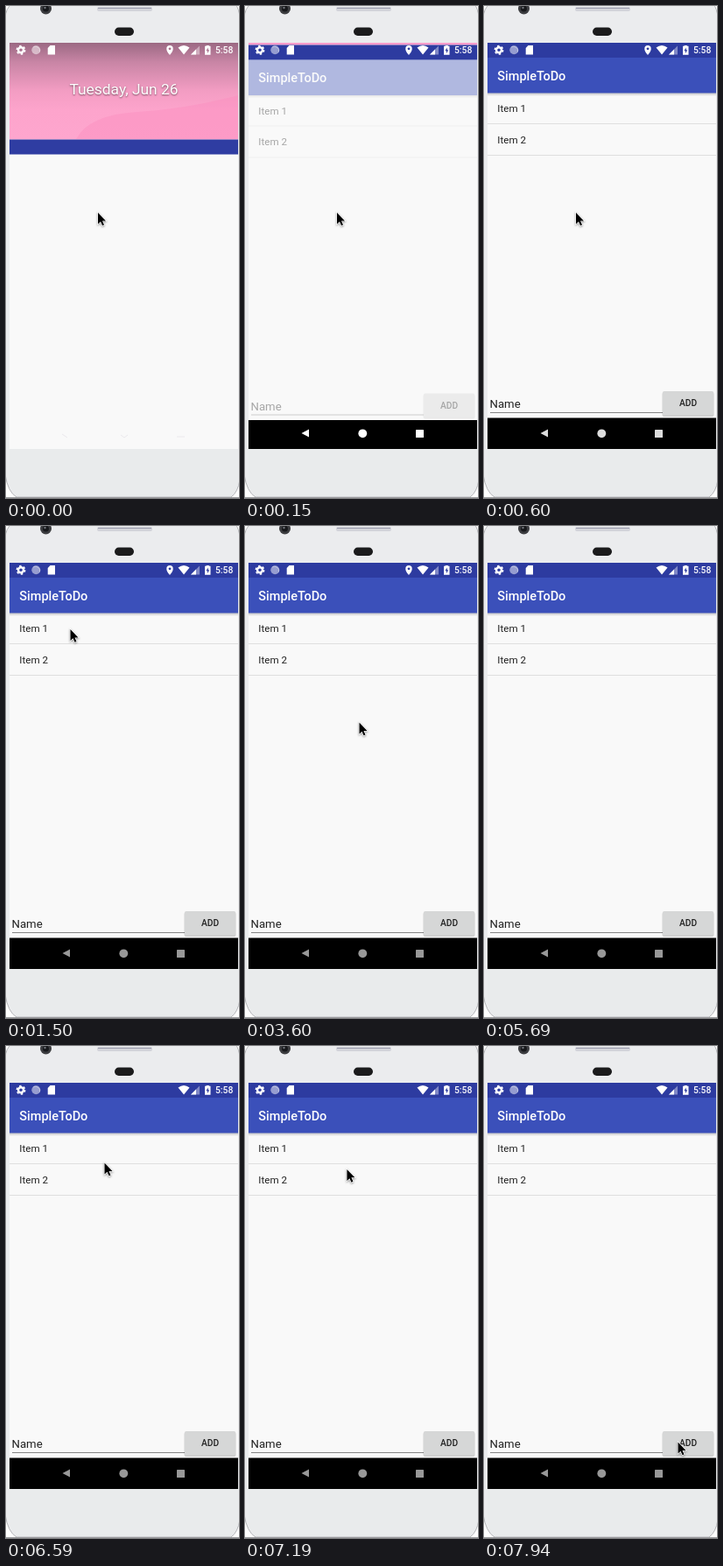
Recreate the animation shown at these times as an HTML page. Size 266 by 562 pixels, loop 8000 ms.

```html
<!DOCTYPE html>
<html lang="en">
<head>
<meta charset="utf-8">
<title>To-do app on a phone</title>
<style>
  html, body { margin: 0; width: 100%; height: 100%; overflow: hidden; background: #fff; }
  svg { display: block; width: 266px; height: 562px; }
  text { font-family: Roboto, sans-serif; fill: #222; }
  .medium { font-weight: 500; }
  .light { fill: #fff; }
</style>
</head>
<body>
<svg viewBox="0 0 266 562">
  <defs>
    <linearGradient id="wallpaper" x2="0" y2="1">
      <stop offset="0" stop-color="#9b6983"/>
      <stop offset=".2" stop-color="#c885a5"/>
      <stop offset=".5" stop-color="#f39dc3"/>
      <stop offset=".7" stop-color="#fda4cc"/>
      <stop offset="1" stop-color="#fea6ce"/>
    </linearGradient>
    <linearGradient id="shade" x2="0" y2="1">
      <stop offset="0" stop-opacity=".2"/>
      <stop offset="1" stop-opacity="0"/>
    </linearGradient>
    <clipPath id="screen"><path d="M4 42H265V506H4Z"/></clipPath>
  </defs>

  <!-- phone body -->
  <path d="M-1 13Q0 3 6 -2H262Q266 3 267 13V541Q265 555 257 561H12Q2 555 -1 535Z" fill="#ebecee" stroke="#b4b5b8"/>
  <path d="M4 506H265V545Q263 555 256 560H13Q5 555 4 540Z" fill="#e9ebec"/>
  <path d="M0 561.5H266" stroke="#9a9b9d"/>
  <circle cx="45.5" cy="3" r="6.5" fill="#3c3d40"/>
  <circle cx="45.5" cy="3" r="3.5" fill="#17181b"/>
  <circle cx="44.5" cy="2" r="1.2" fill="#72757c"/>
  <rect x="104" y="1" width="63" height="5" rx="2" fill="#d3d4da"/>
  <path d="M105 2.500H166" stroke="#9a9bad"/>
  <rect x="124" y="24.500" width="22" height="9.500" rx="4.700" fill="#1b1b1c"/>

  <g clip-path="url(#screen)">
    <rect x="4" y="42" width="261" height="464" fill="#f9f9f9"/>

    <g id="home">
      <rect x="4" y="42" width="261" height="110.500" fill="url(#wallpaper)"/>
      <path d="M80 152Q95 124 150 121T265 102V152Z" fill="#fa8abc" opacity=".4"/>
      <path d="M4 152.500H265V169.500H4Z" fill="#2f3da2"/>
      <path d="M64 489l6 4M131 490l4 3 4-3M195 492h9" fill="none" stroke="#ebe9ed"/>
      <text class="light" x="134.500" y="101" font-size="17.400" text-anchor="middle"
            style="text-shadow:0 1px 2px #0008">Tuesday, Jun 26</text>
    </g>

    <g id="app">
      <path d="M4 39H265V42H4Z" fill="#ff9ccb"/>
      <path d="M4 42H265V59H4Z" fill="#2d3ba0"/>
      <g id="content">
        <path d="M4 59H265V99.500H4Z" fill="#3b50ba"/>
        <path d="M4 99.500H265V103H4Z" fill="url(#shade)"/>
        <text class="medium light" x="15.300" y="84.700" font-size="14.500">SimpleToDo</text>
        <text x="15.300" y="121" font-size="11.600">Item 1</text>
        <text x="15.300" y="156.500" font-size="11.600">Item 2</text>
        <path d="M4 134.500H265M4 170.500H265" stroke="#dfdfdf"/>
        <text x="6.500" y="459" font-size="13.200">Name</text>
        <path d="M7 464.500H204" stroke="#858585"/>
        <rect x="203.500" y="441" width="59" height="28" rx="2" opacity=".17"/>
        <rect x="204" y="440" width="58" height="27.300" rx="1.500" fill="#d6d7d7"/>
        <text class="medium" x="233" y="457.300" font-size="10.200" text-anchor="middle">ADD</text>
      </g>
      <path d="M4 470.500H265V510H4Z"/>
    </g>

    <g id="nav">
      <path d="M64.500 488L73 483.500V492.500Z"/>
      <circle cx="134.300" cy="488.300" r="4.900"/>
      <rect x="195" y="484" width="9" height="9" rx=".6"/>
    </g>

    <!-- status bar -->
    <g class="light" fill="#fff">
      <circle cx="17" cy="50.300" r="3" fill="none" stroke="#fff" stroke-width="2.400"/>
      <circle cx="17" cy="50.300" r="4.700" fill="none" stroke="#fff" stroke-width="1.500" stroke-dasharray="2.460"/>
      <circle cx="34.300" cy="50.300" r="5" opacity=".5"/>
      <path d="M31 47a5 5 0 0 1 7.500 5.500" fill="none" stroke="#fff" opacity=".4"/>
      <path d="M50.500 45H56V55.500H47.700V48Z"/>
      <path id="pin" d="M187 56C184 52.500 183.300 51 183.300 48.800a3.700 3.700 0 0 1 7.400 0C190.700 51 190 52.500 187 56ZM187 47.400a1.400 1.400 0 1 0 .01 0Z" fill-rule="evenodd"/>
      <path d="M196.500 47.500Q203 42.500 209.500 47.500L203 55.500Z"/>
      <path d="M211 55.500L221 45.500V55.500Z" opacity=".4"/>
      <path d="M211 55.500L217 49.500V55.500Z"/>
      <path d="M228.700 45.800V45H231.800V45.800H233.500V55.700H227V45.800ZM230.800 47.500L228.400 51.200H229.900V54.200L232.200 50.300H230.800Z" fill-rule="evenodd"/>
      <text class="medium light" x="239" y="54" font-size="10.300">5:58</text>
    </g>
  </g>

  <path id="cursor" d="M0 0V13L3 10.300L5 14.800L7 13.900L5 9.400H9Z" stroke="#fff"
        stroke-width="1.400" paint-order="stroke" style="filter:drop-shadow(0 1px 1px #0006)"/>
</svg>

<script>
const LOOP = 8000;
const STEP = 150;

const el = id => document.getElementById(id);
const show = (id, on) => el(id).setAttribute("visibility", on ? "visible" : "hidden");
const smooth = p => p * p * (3 - 2 * p);

// Progress from 0 to 1, advancing once per refresh
function progress(t, start, end) {
  const elapsed = Math.floor((t - start) / STEP) * STEP;
  return Math.min(1, Math.max(0, elapsed / (end - start)));
}

// Pointer strokes: each one glides from where the last one ended
const rest = { x: 105, y: 236 };
const strokes = [
  { start: 900, end: 1500, x: 73.5, y: 118 },
  { start: 3450, end: 3600, x: 130.5, y: 224.5 },
  { start: 3600, end: 3750, x: 216, y: 525 },
  { start: 3890, end: 4340, x: 206, y: 551 },
  { start: 5090, end: 5690, x: 230, y: 600 },
  { start: 5990, end: 6140, x: 196, y: 526 },
  { start: 6140, end: 6590, x: 112.5, y: 133.5 },
  { start: 6590, end: 7040, x: 108, y: 116 },
  { start: 7040, end: 7940, x: 221.5, y: 452.5 }
];

function pointerAt(t) {
  let { x, y } = rest;
  for (const stroke of strokes) {
    const p = smooth(progress(t, stroke.start, stroke.end));
    x += (stroke.x - x) * p;
    y += (stroke.y - y) * p;
  }
  return `${x} ${y}`;
}

function draw(t) {
  const opening = t < 300;
  show("home", t < 150);
  show("app", t >= 150);
  show("nav", t >= 150);
  show("pin", t < 5690);

  el("app").setAttribute("transform", `translate(0 ${opening ? 2.5 : 0})`);
  el("content").setAttribute("opacity", opening ? 0.38 : 1);

  const shade = 255 - 103 * progress(t, 450, 900);
  el("nav").setAttribute("fill", `rgb(${shade},${shade},${shade})`);
  el("cursor").setAttribute("transform", `translate(${pointerAt(t)})`);
}

function tick() {
  draw(performance.now() % LOOP);
  requestAnimationFrame(tick);
}
tick();
</script>
</body>
</html>
```
